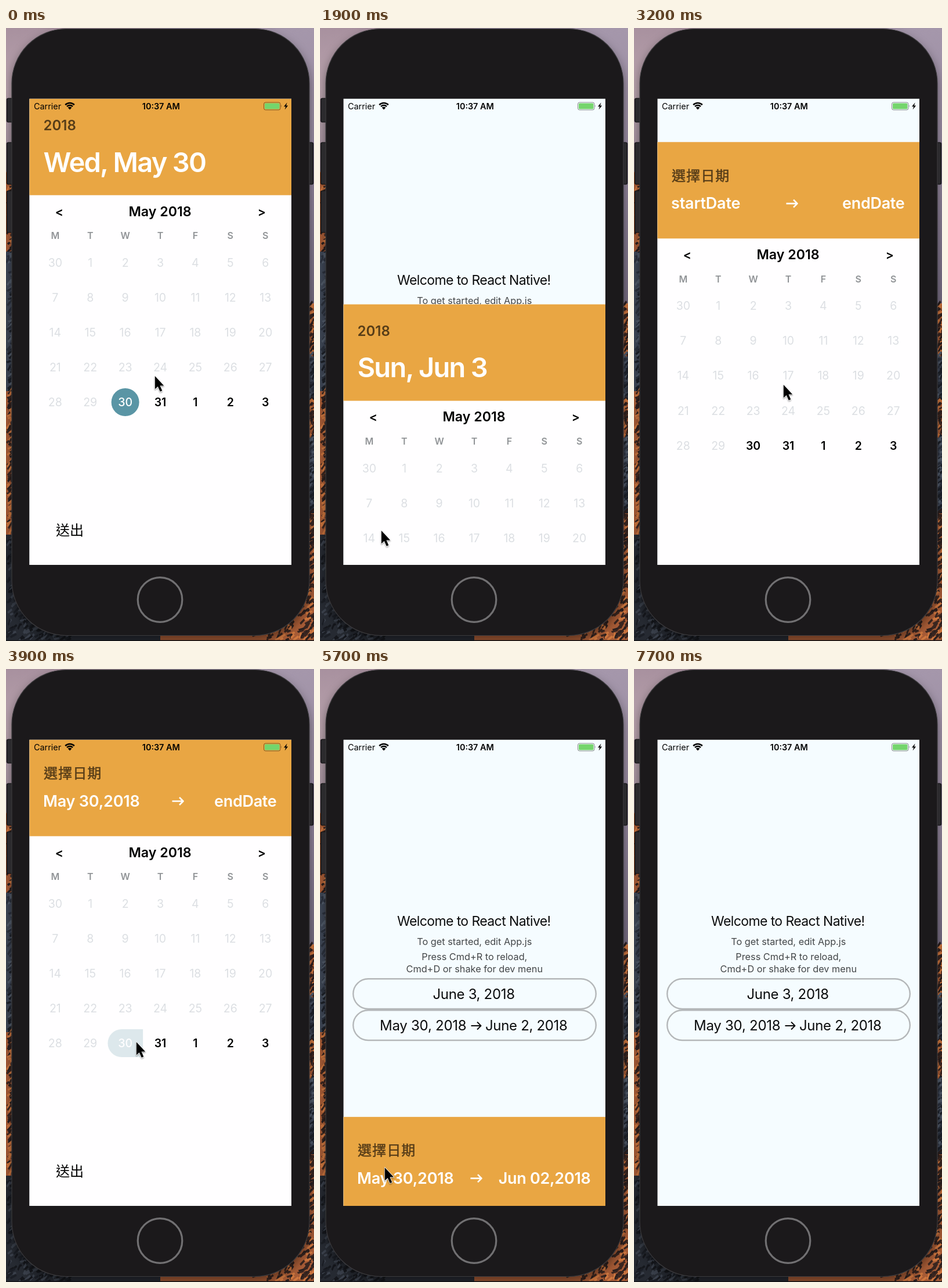
Recreate the animation shown at these times as an HTML page. Size 531 by 1055 pixels, loop 7800 ms.

```html
<!DOCTYPE html>
<html lang="en">
<head>
<meta charset="utf-8">
<title>Date picker demo</title>
<style>
  html, body { margin: 0; width: 100%; height: 100%; overflow: hidden; background: #1b191b; }
  svg { display: block; width: 531px; height: 1055px; }
  text { font-family: Inter, Roboto, sans-serif; font-optical-sizing: none; white-space: pre; }
  .cjk { font-family: "Noto Sans CJK TC", "Noto Sans CJK JP", "Noto Sans CJK", sans-serif; }
</style>
</head>
<body>
<svg id="stage" viewBox="0 0 531 1055" xmlns="http://www.w3.org/2000/svg">
  <defs>
    <linearGradient id="sky" x2="0" y2="1">
      <stop offset="0" stop-color="#a8919f"/>
      <stop offset=".4" stop-color="#b8a2ac"/>
      <stop offset="1" stop-color="#9c8b98"/>
    </linearGradient>
    <linearGradient id="dusk" x2="0" y2="1">
      <stop offset="0" stop-color="#a597ab"/>
      <stop offset=".45" stop-color="#978aa0"/>
      <stop offset="1" stop-color="#746a80"/>
    </linearGradient>
    <clipPath id="screen"><rect x="40.5" y="121.7" width="451.5" height="802.3"/></clipPath>
    <filter id="soft" x="-50%" y="-50%" width="200%" height="200%">
      <feDropShadow dx="0" dy="1.5" stdDeviation="1.3" flood-opacity=".4"/>
    </filter>
    <filter id="shade" x="-10%" y="-10%" width="120%" height="120%">
      <feDropShadow dx="0" dy="8" stdDeviation="9" flood-opacity=".45"/>
    </filter>
  </defs>
  <g id="wall"></g>
  <g id="phone"></g>
  <g clip-path="url(#screen)">
    <g id="home"></g>
    <g id="single"></g>
    <g id="range"></g>
    <g id="status"></g>
  </g>
  <g id="cursor" filter="url(#soft)">
    <path d="M.8 1V23.4L5.8 18.9L9.7 27.8L13.3 26.3L9.5 17.4H16.2Z" fill="#000" stroke="#fff" stroke-width="1.4" stroke-linejoin="round" paint-order="stroke"/>
  </g>
</svg>
<script>
const LOOP = 7800, STEP = 100;
const ORANGE = '#e9a643', TEAL = '#5a95a5', PALE = '#dcdfe3', BROWN = '#573d18';
const $ = id => document.getElementById(id);

function add(parent, tag, attrs) {
  const el = document.createElementNS('http://www.w3.org/2000/svg', tag);
  for (const k in attrs) el.setAttribute(k, attrs[k]);
  parent.appendChild(el);
  return el;
}
const box = (p, x, y, width, height, fill, more) => add(p, 'rect', { x, y, width, height, fill, ...more });
const line = (p, d, stroke, width, more) =>
  add(p, 'path', { d, fill: 'none', stroke, 'stroke-width': width, ...more });
function label(p, x, y, str, size, more) {
  const el = add(p, 'text', { x, y, 'font-size': size, ...more });
  el.textContent = str;
  return el;
}
const mid = { 'text-anchor': 'middle' }, semi = { 'font-weight': 600 };
const show = (el, on) => el.setAttribute('display', on ? 'inline' : 'none');

// Wallpaper: flat bands with seeded rocky strokes
function drawWall() {
  const g = $('wall');
  box(g, 0, 0, 266, 260, 'url(#sky)');
  box(g, 266, 0, 265, 490, 'url(#dusk)');
  const rust = ['#a85c36', '#d0783f', '#3a2620', '#2a1f1e'];
  const slate = ['#3f4756', '#525c6b', '#1d2129', '#2c323e'];
  const night = ['#262a32', '#3a404b', '#15171c', '#1b1e25'];
  const bands = [
    [0, 248, 385, rust], [0, 385, 625, slate], [0, 625, 872, rust], [0, 872, 1055, night],
    [1, 475, 565, rust], [1, 565, 640, slate], [1, 640, 705, rust], [1, 705, 835, slate], [1, 835, 1055, rust]
  ];
  let seed = 11;
  const rnd = () => (seed = seed * 16807 % 2147483647) / 2147483647;
  for (const [side, top, end, tones] of bands) {
    box(g, side * 266, top, 266, end - top, tones[0]);
    for (let y = top; y < end; y += 3.5) {
      const reach = y > 930 ? 110 : 14;
      const n = y > 930 ? 9 : 2;
      for (let i = 0; i < n; i++) {
        const d = rnd() * reach, x = side ? 531 - d : d;
        const w = 3 + rnd() * 8, h = 2 + rnd() * 8;
        const tone = tones[1 + Math.floor(rnd() * 3)];
        add(g, 'path', { d: `M${x} ${y}l${w} ${-h}l2 3l${-w} ${h}z`, fill: tone });
      }
    }
  }
  box(g, 0, 1053.5, 531, 1.5, '#17171b');
}

function drawPhone() {
  const g = $('phone');
  const body = more => box(g, 10, 1.5, 513, 1044, '#1b191b', { rx: 94, ...more });
  body({ filter: 'url(#shade)' });
  for (const [x, y, h] of [[1.5, 121, 41], [1.5, 197, 72], [1.5, 280, 72], [519.5, 197, 72]])
    box(g, x, y, 10, h, '#2b2a2d', { rx: 2.5, stroke: '#0d0d0f', 'stroke-width': 1.2 });
  body({ stroke: '#3b3a3d', 'stroke-width': 1.2 });
  add(g, 'circle', { cx: 265.5, cy: 984, r: 38.3, fill: 'none', stroke: '#717072', 'stroke-width': 3.2 });
}

function drawStatus() {
  const g = $('status');
  label(g, 48, 139.5, 'Carrier', 14.4);
  label(g, 267.3, 139.5, '10:37 AM', 14.4, { ...mid, ...semi });
  const arc = (r, w) => {
    const k = r * Math.SQRT1_2;
    line(g, `M${110 - k} ${140 - k}A${r} ${r} 0 0 1 ${110 + k} ${140 - k}`, '#000', w);
  };
  arc(11, 2.6);
  arc(7, 2.5);
  add(g, 'path', { d: 'M110 140.4l-3.3-3.4a4.7 4.7 0 0 1 6.6 0z' });
  box(g, 444.5, 128, 28.5, 13, 'none', { rx: 3, stroke: '#000', 'stroke-opacity': .45, 'stroke-width': 1 });
  box(g, 446, 129.5, 25.5, 10, '#74d56c', { rx: 1.6 });
  add(g, 'path', { d: 'M474.2 132.3q1.8 2.2 0 4.4z', 'fill-opacity': .5 });
  add(g, 'path', { d: 'M484.6 128.2L479 135.3H482.2L480.6 140.6L486.2 133.4H483z' });
}

const arrow = (p, x, y, w, color, width) =>
  line(p, `M${x - w / 2} ${y}H${x + w / 2}m-6.5 -6.5l6.5 6.5l-6.5 6.5`, color, width, { 'stroke-linejoin': 'round' });

function drawHome() {
  const g = $('home'), ink = '#0b0c0d', grey = '#434648';
  box(g, 40, 121, 453, 804, '#f5fcff');
  label(g, 265.3, 441.5, 'Welcome to React Native!', 23, { ...mid, fill: ink, 'letter-spacing': -.6 });
  ['To get started, edit App.js', 'Press Cmd+R to reload,', 'Cmd+D or shake for dev menu'].forEach((s, i) =>
    label(g, 266.3, [474.8, 501.3, 521.8][i], s, 16.3, { ...mid, fill: grey }));
  const field = y => box(g, 57.2, y, 418.6, 51.8, 'none', { rx: 25.9, stroke: '#b4b7b9', 'stroke-width': 2.4 });
  const value = (p, x, y, s, fill, gap) => label(p, x, y, s, 24, { fill, 'letter-spacing': gap });
  field(533.2);
  field(587.2);
  const day = value(g, 194.5, 568, 'June 3, 2018', ink, -.33);
  const hint = add(g, 'g', {}), span = add(g, 'g', {});
  value(hint, 119.5, 622, 'Apr 27, 2018', '#cdd1d4', -.65);
  arrow(hint, 268, 614, 17, '#cdd1d4', 1.8);
  value(hint, 283.5, 622, 'Jul 10, 2018', '#cdd1d4', -.5);
  value(span, 103, 622, 'May 30, 2018', ink, -.25);
  arrow(span, 269, 614, 17, ink, 1.9);
  value(span, 285, 622, 'June 2, 2018', ink, -.33);
  return { day, hint, span };
}

// Background of one day cell, centred on 0,0
function cellShape(first, last) {
  if (first && last) return 'M0 -24A24 24 0 0 0 0 24A24 24 0 0 0 0 -24Z';
  return (first ? 'M-6.2 -24A24 24 0 0 0 -6.2 24' : 'M-30.5 -24V24') +
    (last ? 'H6.2A24 24 0 0 0 6.2 -24Z' : 'H30.5V-24Z');
}

function drawPicker(g) {
  box(g, 40, 121.7, 453, 803, '#fffeff');
  box(g, 40, 121.7, 453, 166, ORANGE);
  label(g, 91.7, 323.5, '<', 21, { ...mid, ...semi });
  label(g, 440.8, 323.5, '>', 21, { ...mid, ...semi });
  label(g, 265.5, 323.5, 'May 2018', 23.2, { ...mid, ...semi });
  const colX = i => 84.8 + 60.4 * i;
  [...'MTWTFSS'].forEach((s, i) => label(g, colX(i), 363, s, 16, { ...mid, ...semi, fill: '#919497' }));
  const cells = [];
  for (let i = 0; i < 35; i++) {
    const date = i === 0 ? 30 : i <= 31 ? i : i - 31;
    const cell = add(g, 'g', { transform: `translate(${colX(i % 7)} ${403.6 + 60.1 * Math.floor(i / 7)})` });
    const bg = add(cell, 'path', { fill: TEAL });
    const text = label(cell, 0, 7.1, date, 19.5, { ...mid, fill: PALE });
    cells.push({ cell, bg, text });
  }
  const send = label(g, 86, 873, '送出', 24, { class: 'cjk' });
  return { g, cells, send };
}

function mark(picker, from, to) {
  for (let i = 30; i < 35; i++) {
    const { bg, text } = picker.cells[i], on = i >= from && i <= to.day;
    show(bg, on);
    if (on) bg.setAttribute('d', cellShape(i === from, i === to.day && to.closed));
    text.setAttribute('fill', on ? '#fff' : '#000');
    text.setAttribute('font-weight', on ? 500 : 600);
  }
}

drawWall();
drawPhone();
drawStatus();
const home = drawHome();
const single = drawPicker($('single')), range = drawPicker($('range'));

label(single.g, 64.5, 176, '2018', 24, { ...semi, fill: BROWN });
const title = label(single.g, 64.5, 247.5, '', 47, { ...semi, fill: '#fff', 'letter-spacing': -1.7 });

label(range.g, 65, 188, '選擇日期', 24,
  { class: 'cjk', fill: BROWN, stroke: BROWN, 'stroke-width': .5, 'font-weight': 500, 'letter-spacing': 1.1 });
const white = { ...semi, fill: '#fff' };
const startText = label(range.g, 64, 236.8, '', 27, { ...white, 'letter-spacing': -.2 });
const endText = label(range.g, 466.5, 236.8, '', 27, { ...white, 'text-anchor': 'end', 'letter-spacing': -.3 });
const headArrow = add(range.g, 'g', {});
arrow(headArrow, 0, 227.5, 19, '#fff', 2.6);

// [time, x, y] of the pointer tip
const path = [
  [0, 256, 598], [100, 258, 600], [550, 444, 640], [900, 444, 641], [1550, 106, 864], [1950, 105, 864],
  [2700, 257, 613], [3250, 257, 613], [3700, 224, 641], [3950, 224, 641], [4300, 384, 645], [4500, 382, 648],
  [4800, 212, 781], [5150, 110, 858], [5800, 111, 857], [6800, 150, 1075], [7800, 150, 1075]
];
function pointer(t) {
  const i = path.findIndex(p => p[0] > t), a = path[i - 1], b = path[i];
  const k = (t - a[0]) / (b[0] - a[0]), e = k * k * (3 - 2 * k);
  return [a[1] + (b[1] - a[1]) * e, a[2] + (b[2] - a[2]) * e];
}

const clamp = v => Math.min(1, Math.max(0, v));
// Critically damped sheet motion, 0 to 1
function spring(ms) {
  const w = Math.max(0, ms) * .01826;
  return ms > 600 ? 1 : 1 - (1 + w) * Math.exp(-w);
}
// Touch feedback: fades while held, recovers on release
const dip = (t, down, up) => 1 - .8 * clamp((t - down) / 120) * (1 - clamp((t - up) / 220));
const fade = (el, v) => el.setAttribute('opacity', v);
function slide(picker, shift) {
  show(picker.g, shift < 802);
  picker.g.setAttribute('transform', `translate(0 ${shift.toFixed(2)})`);
}

function draw(t) {
  slide(single, 802 * spring(t - 1818));
  const picked = t >= 700;
  title.textContent = picked ? 'Sun, Jun 3' : 'Wed, May 30';
  const day = picked ? 34 : 30;
  mark(single, day, { day, closed: true });
  fade(single.cells[34].cell, dip(t, 550, 700));
  fade(single.send, dip(t, 1580, 1740));

  slide(range, t < 4500 ? 802 * (1 - spring(t - 2982)) : 802 * spring(t - 5532.5));
  const begun = t >= 3880, ended = t >= 4400;
  startText.textContent = begun ? 'May 30,2018' : 'startDate';
  endText.textContent = ended ? 'Jun 02,2018' : 'endDate';
  headArrow.setAttribute('transform', `translate(${ended ? 269 : begun ? 296 : 272} 0)`);
  mark(range, begun ? 30 : 99, { day: ended ? 33 : 30, closed: ended });
  fade(range.cells[30].cell, dip(t, 3740, 3900));
  fade(range.cells[33].cell, dip(t, 4260, 4400));
  fade(range.send, dip(t, 5280, 5440));

  show(home.day, t >= 1750);
  show(home.hint, t < 5450);
  show(home.span, t >= 5450);

  const [x, y] = pointer(t);
  $('cursor').setAttribute('transform', `translate(${x.toFixed(1)} ${y.toFixed(1)})`);
  show($('cursor'), y < 1060);
}

const begin = performance.now();
function tick() {
  const t = (performance.now() - begin) % LOOP;
  draw(Math.floor(t / STEP) * STEP);
  requestAnimationFrame(tick);
}
tick();
</script>
</body>
</html>
```
